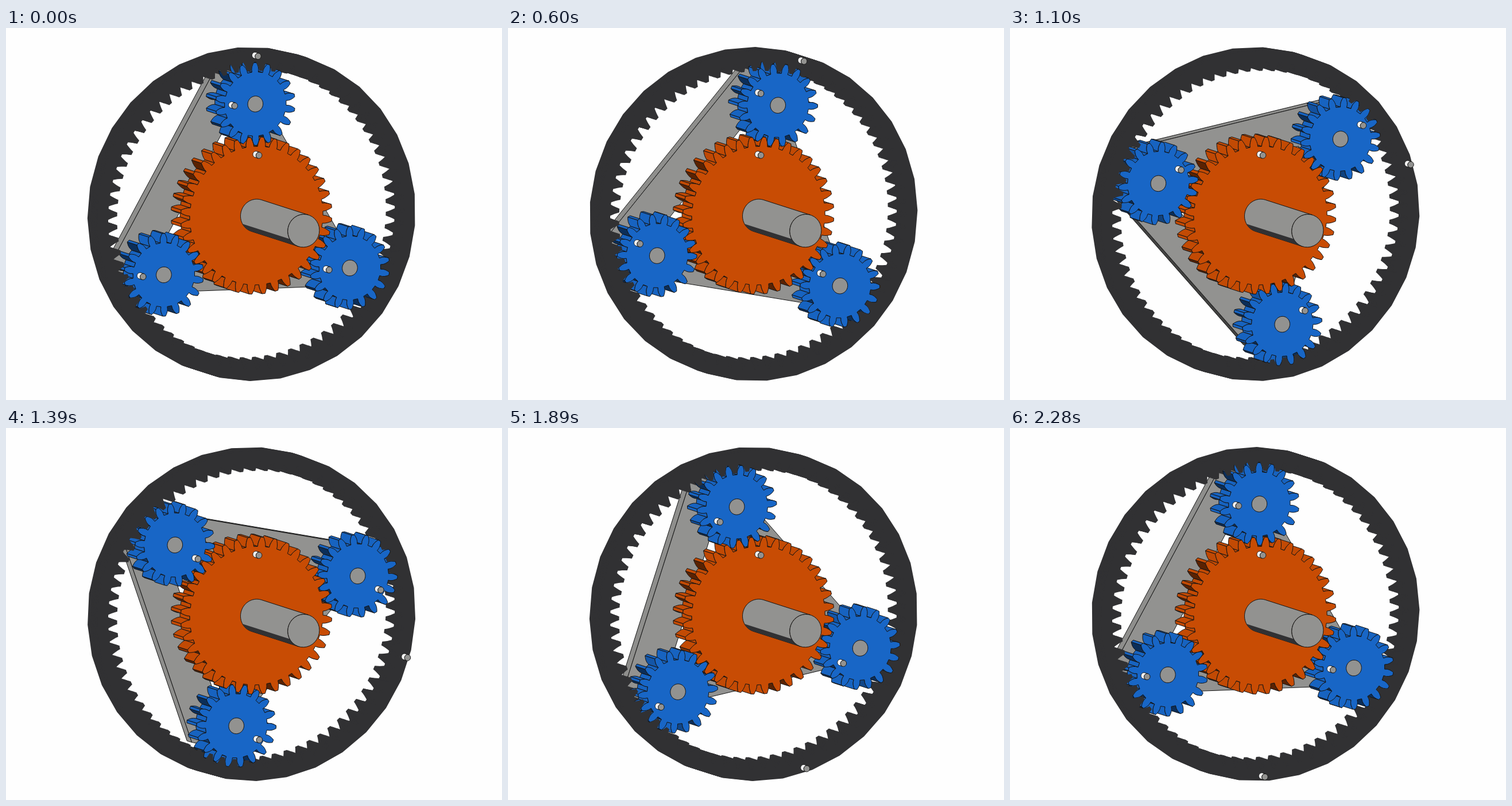
Write an HTML page with a canvas that moves like this. It is 864 px wide and 648 px high and loops after 2.5 s.

```html
<!DOCTYPE html>
<html lang="en">
<head>
<meta charset="utf-8">
<title>Planetary gear</title>
<style>
html, body { margin: 0; width: 100%; height: 100%; overflow: hidden; background: #fefefe; }
canvas { display: block; }
</style>
</head>
<body>
<canvas id="stage" width="864" height="648"></canvas>
<script>
const ctx = document.getElementById('stage').getContext('2d');
const BLUE = [24, 102, 198], ORANGE = [200, 76, 4], DARK = [49, 49, 51], GRAY = [146, 146, 144];
const LOOP = 2500, MODULE = 7.236, ORBIT = 195.4, THICK = 59;
const VIEW = [-0.951, 0.309]; // in-plane direction towards the camera
const RAD = Math.PI / 180;

// [time in ms, progress in 25ths of the swing]
const STEPS = [[0, 0], [420, 1], [465, 2], [510, 3], [555, 4], [600, 4.9], [780, 6], [835, 7],
  [890, 8], [920, 9], [1010, 10], [1100, 11], [1250, 12.5], [1390, 14], [1500, 15.2],
  [1585, 16.3], [1670, 17.4], [1750, 18.7], [1890, 20.1], [2000, 21.5], [2100, 22.9], [2280, 25]];

// Orthographic projection: x right, y up, z along the shaft
const project = ([x, y], z) => [
  436.1 + 0.9575 * x - 0.0087 * y + 0.2876 * z,
  326.8 - 0.0353 * x - 0.995 * y + 0.0923 * z
];
const polar = (r, deg, [cx, cy] = [0, 0]) =>
  [cx + r * Math.sin(deg * RAD), cy + r * Math.cos(deg * RAD)];
const rgb = (color, f = 1) => `rgb(${color.map(c => Math.round(c * f))})`;
const dot = (a, b) => a[0] * b[0] + a[1] * b[1];

function trace(points) {
  points.forEach((p, i) => i ? ctx.lineTo(...p) : ctx.moveTo(...p));
  ctx.closePath();
}

function paint(loops, fill, outline = true) {
  ctx.beginPath();
  loops.forEach(trace);
  ctx.fillStyle = fill;
  ctx.fill('evenodd');
  if (outline) ctx.stroke();
}

const arc = (r, from, to, center) =>
  Array.from({ length: 33 }, (_, i) => polar(r, from + (to - from) * i / 32, center));
const flat = (points, z) => points.map(p => project(p, z));
const sweep = (points, z1, z2) => [...flat(points, z1), ...flat(points, z2).reverse()];

// Involute gear outline as a list of faces: flank, tip, flank, root for each tooth
function gear(teeth, root, tip, turn, center) {
  const pitch = teeth * MODULE / 2, base = pitch * Math.cos(20 * RAD), step = 360 / teeth;
  const inv = a => Math.tan(a) - a;
  const half = r => step / 4 +
    (inv(20 * RAD) - inv(Math.acos(base / Math.max(r, base)))) / RAD;
  const radii = [0, 0.3, 0.55, 0.8, 1].map(t => root + (tip - root) * t);
  const faces = [];
  for (let i = 0; i < teeth; i++) {
    const mid = turn + i * step;
    const rise = radii.map(r => polar(r, mid - half(r), center));
    const fall = radii.map(r => polar(r, mid + half(r), center)).reverse();
    const next = polar(root, mid + step - half(root), center);
    faces.push(rise, [rise[4], fall[0]], fall, [fall[4], next]);
  }
  return faces;
}

// Side walls of an extruded outline that the camera can see
function visibleWalls({ faces, color, front = 0, depth = THICK }) {
  const walls = [];
  for (const face of faces) {
    const a = face[0], b = face[face.length - 1];
    const normal = [a[1] - b[1], b[0] - a[0]];
    if (dot(normal, VIEW) <= 0) continue;
    const up = normal[1] / Math.hypot(...normal);
    const light = Math.max(0.45, 0.97 + 4 * Math.min(0, up + 0.34));
    walls.push({
      shape: sweep(face, front, front - depth),
      fill: rgb(color, light),
      near: dot(a, VIEW) + dot(b, VIEW)
    });
  }
  return walls;
}

// Solids with a common front plane: all walls from far to near, then the front faces
function paintSolids(solids) {
  solids.flatMap(visibleWalls)
    .sort((a, b) => a.near - b.near)
    .forEach(w => paint([w.shape], w.fill));
  for (const { faces, color, front = 0, hole = [] } of solids) {
    paint([flat(faces.flat(), front), flat(hole, front)], rgb(color));
  }
}

const disc = (r, center, z) => paint([flat(arc(r, 0, 360, center), z)], rgb(GRAY));

// Cylinder standing on the front plane; its visible side spans 198 to 378 degrees
const cylinder = (r, center, length, fill) =>
  paint([sweep(arc(r, 198, 378, center), 0, length)], fill);

function pin(center) {
  cylinder(5.4, center, 19, '#f4f4f4');
  disc(5.4, center, 19);
}

function carrier(turn) {
  const corners = [0, 120, 240].flatMap(a =>
    [polar(244.8, turn + a - 6.1), polar(244.8, turn + a + 6.1)]);
  const faces = corners.map((p, i) => [p, corners[(i + 1) % corners.length]]);
  const hole = [0, 120, 240].map(a => polar(156, turn + a));
  paintSolids([{ faces, color: GRAY, front: -155, depth: 29, hole }]);
}

function shaft() {
  const r = 28.8, length = 286;
  cylinder(r, [0, 0], length, rgb(GRAY));
  paint([sweep(arc(r, 198, 242), 0, length)], rgb(DARK), false);
  disc(r, [0, 0], length);
}

function draw(ms) {
  const step = STEPS.filter(s => s[0] <= ms).pop()[1];
  const ringTurn = 90 * (1 - Math.cos(Math.PI * step / 25));
  const carrierTurn = ringTurn * 2 / 3, planetTurn = ringTurn * 2;
  const centers = [0, 120, 240].map(a => polar(ORBIT, carrierTurn + a));

  ctx.fillStyle = '#fefefe';
  ctx.fillRect(0, 0, 864, 648);
  ctx.strokeStyle = '#141414';
  ctx.lineWidth = 1;
  ctx.lineJoin = 'round';

  carrier(carrierTurn);

  // The ring is one flat tone, so stacked slices give its whole body
  const rim = Array.from({ length: 33 }, (_, i) => polar(289.6, ringTurn - 90 + i * 360 / 33));
  const hole = gear(72, 253.3, 269.5, ringTurn).flat();
  const slice = z => paint([flat(rim, z), flat(hole, z)], rgb(DARK), false);
  for (let i = 8; i > 0; i--) slice(-THICK * i / 8);

  paintSolids([
    { faces: gear(36, 121.2, 137.5, 5), color: ORANGE },
    ...centers.map(c => ({ faces: gear(18, 56.1, 72.4, planetTurn, c), color: BLUE }))
  ]);
  slice(0);

  for (const c of centers) {
    disc(13.9, c, 0);
    pin(polar(43.4, planetTurn - 90, c));
  }
  pin([0, 107.3]);
  pin(polar(280.7, ringTurn));
  shaft();
}

const start = performance.now();
function tick() {
  draw((performance.now() - start) % LOOP);
  requestAnimationFrame(tick);
}
tick();
</script>
</body>
</html>
```
